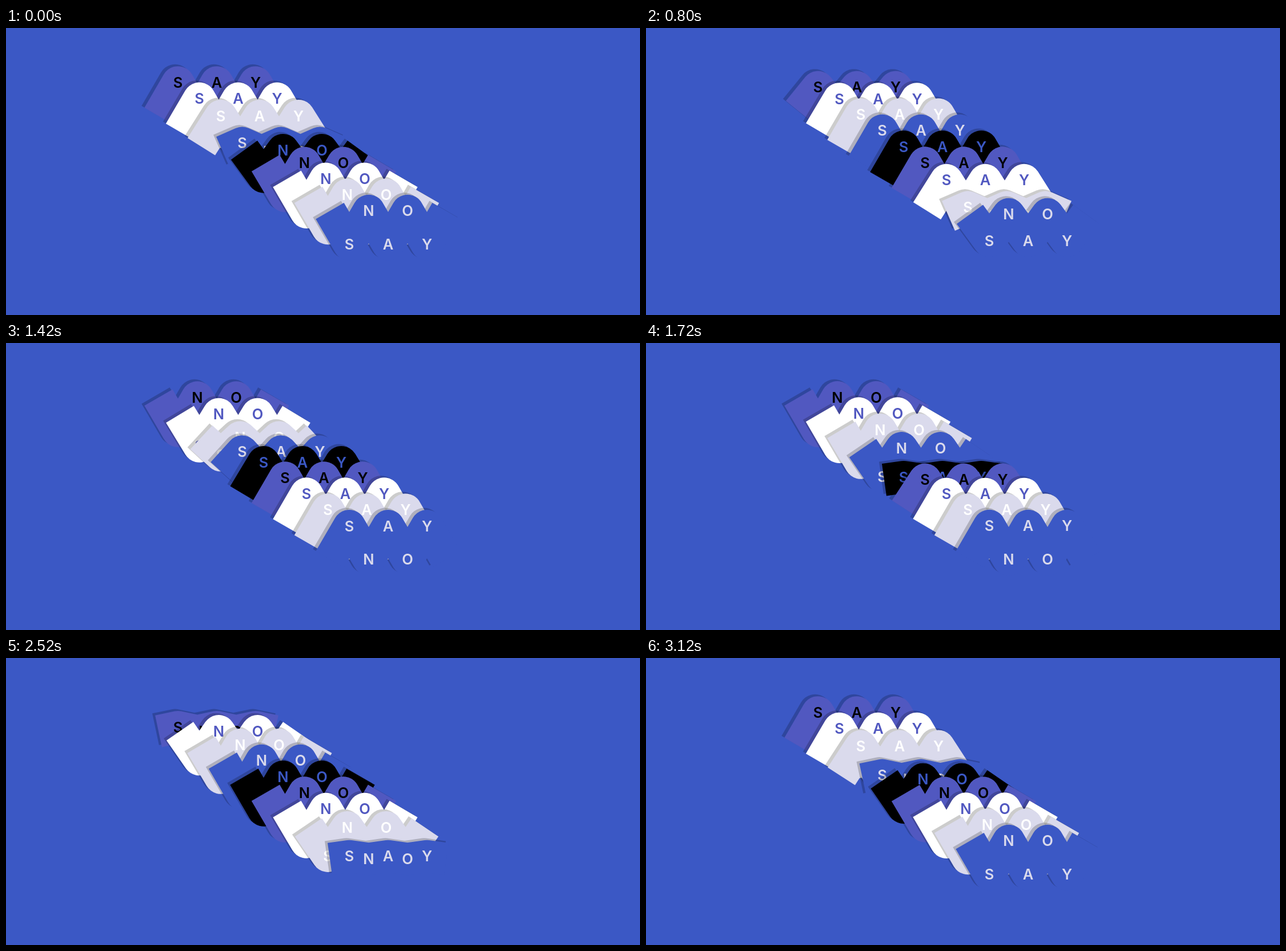
An HTML page with a canvas that plays this animation: 1110 px wide and 504 px high, repeating every 3140 ms.

```html
<!DOCTYPE html>
<html lang="en">
<head>
<meta charset="utf-8">
<title>Say no</title>
<style>
  html, body { margin: 0; width: 100%; height: 100%; overflow: hidden; background: #3b58c5; }
  canvas { display: block; width: 1110px; height: 504px; }
</style>
</head>
<body>
<canvas id="stage" width="1110" height="504"></canvas>
<script>
const ctx = document.getElementById('stage').getContext('2d');

const LOOP = 3140;
const BLUE = '#3b58c5';
const COLORS = ['#5158c0', '#ffffff', '#dadaec', BLUE, '#000000'];
const LAYERS = 9;
const LETTERS = ['', 'S', 'N', 'A', 'O', 'Y', ''];

const ORIGIN = { x: 267, y: 125 };    // start of the rearmost ribbon
const OFFSET = { x: 37.5, y: 28.2 };  // from one ribbon to the next
const SHADOW = { x: -5, y: -3.4 };
const STEP = 34;                      // distance between folds
const AMPLITUDE = STEP * Math.tan(Math.PI / 3) / 2;
const RIBBON_WIDTH = 57;

const FLIP_TIME = 2503;
const DELAY = 200;
const SHARPNESS = 3.4;

// 1: SAY on top, -1: NO on top
function pose(time, layer) {
  const phase = (time - FLIP_TIME - layer * DELAY) / LOOP * 2 * Math.PI;
  return Math.tanh(SHARPNESS * Math.sin(phase));
}

function foldPoints(time, layer) {
  const swing = AMPLITUDE * pose(time, layer);
  return LETTERS.map((letter, i) => ({
    letter,
    x: ORIGIN.x + layer * OFFSET.x + i * STEP,
    y: ORIGIN.y + layer * OFFSET.y + (i % 2 ? -swing : swing)
  }));
}

function strokeRibbon(points, color, dx = 0, dy = 0) {
  ctx.strokeStyle = color;
  ctx.beginPath();
  points.forEach(p => ctx.lineTo(p.x + dx, p.y + dy));
  ctx.stroke();
}

function drawLayer(time, layer) {
  const points = foldPoints(time, layer);
  const index = layer % COLORS.length;
  strokeRibbon(points, 'rgba(0, 0, 0, 0.2)', SHADOW.x, SHADOW.y);
  strokeRibbon(points, COLORS[index]);
  ctx.fillStyle = COLORS[(index + COLORS.length - 1) % COLORS.length];
  points.forEach(p => ctx.fillText(p.letter, p.x, p.y + 9.2));
}

function draw(time) {
  ctx.fillStyle = BLUE;
  ctx.fillRect(0, 0, 1110, 504);
  ctx.lineWidth = RIBBON_WIDTH;
  ctx.lineJoin = 'round';
  ctx.lineCap = 'butt';
  ctx.font = '600 25.5px Inter, sans-serif';
  ctx.textAlign = 'center';
  for (let layer = 0; layer < LAYERS; layer++) drawLayer(time, layer);
}

const start = performance.now();
function tick() {
  draw((performance.now() - start) % LOOP);
  requestAnimationFrame(tick);
}
tick();
</script>
</body>
</html>
```
